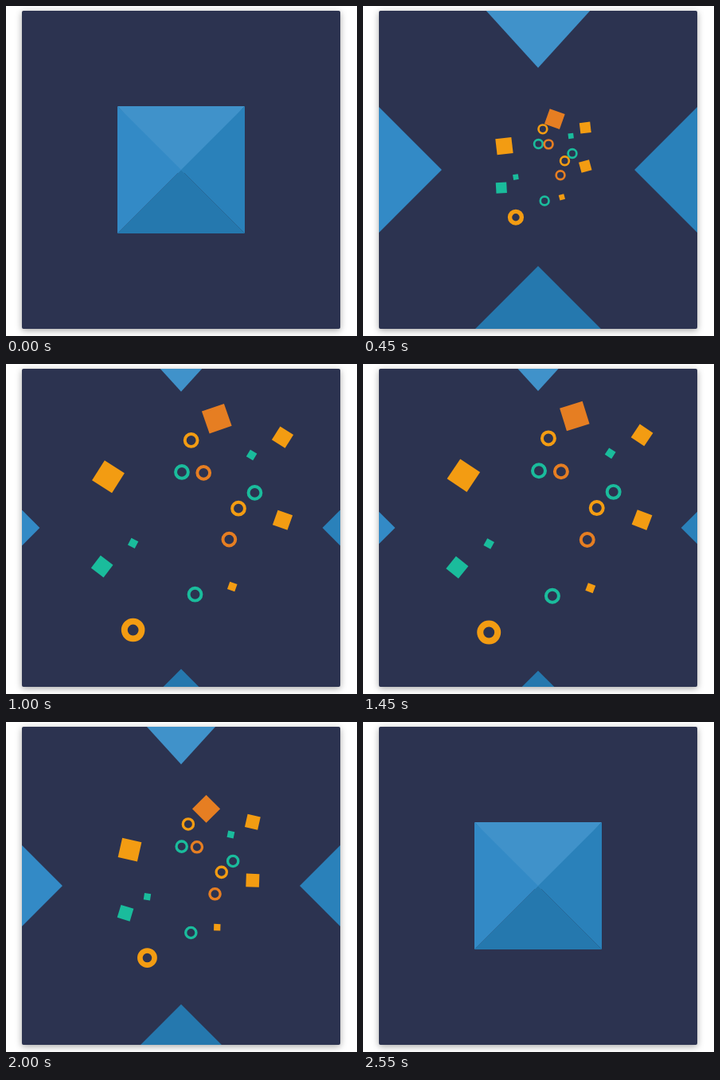
Animation, 441 px wide and 415 px high, one loop 2850 ms. Source, as an HTML page with a canvas:

```html
<!DOCTYPE html>
<html lang="en">
<head>
<meta charset="utf-8">
<title>Burst</title>
<style>
  html, body { margin: 0; width: 100%; height: 100%; overflow: hidden; background: #fff; }
  canvas { display: block; }
</style>
</head>
<body>
<canvas id="stage" width="441" height="415"></canvas>
<script>
const ctx = document.getElementById('stage').getContext('2d');
const LOOP = 2850, STEP = 50;
const PANEL = { x: 20, y: 6, size: 400 };
const CENTER = { x: 220, y: 206 };
const TRAVEL = 180;
const YELLOW = '#f39c12', ORANGE = '#e67e22', GREEN = '#1abc9c';

// x and y are the offset from the centre at full spread, turn is in degrees
const squares = [
  { x: 46, y: -141, size: 30, turn: 163, color: ORANGE },
  { x: -94, y: -66, size: 30, turn: 124, color: YELLOW },
  { x: 131, y: -117, size: 20, turn: 124, color: YELLOW },
  { x: 131, y: -10, size: 20, turn: 111, color: YELLOW },
  { x: 66, y: 76, size: 10, turn: 111, color: YELLOW },
  { x: -102, y: 50, size: 20, turn: 129, color: GREEN },
  { x: -62, y: 20, size: 10, turn: 119, color: GREEN },
  { x: 91, y: -94, size: 10, turn: 123, color: GREEN }
];
const rings = [
  { x: 13, y: -113, size: 20, line: 4, color: YELLOW },
  { x: 1, y: -72, size: 20, line: 4, color: GREEN },
  { x: 29, y: -71, size: 20, line: 4, color: ORANGE },
  { x: 95, y: -45.3, size: 20, line: 4, color: GREEN },
  { x: 74, y: -25, size: 20, line: 4, color: YELLOW },
  { x: 62, y: 15, size: 20, line: 4, color: ORANGE },
  { x: 18, y: 86, size: 20, line: 4, color: GREEN },
  { x: -62, y: 132, size: 30, line: 8, color: YELLOW }
];

const easeOut = (x, power) => 1 - Math.pow(1 - x, power);

// Linear progress: 0 when closed, 1 when fully open
function openness(time) {
  if (time < 150 || time >= 2550) return 0;
  const rise = (time - 72) / 1216;
  const fall = (2561 - time) / 1263;
  return Math.min(rise, fall, 1);
}

// The motion advances in even steps with two short holds
function stepTime(now) {
  const time = Math.floor((now % LOOP) / STEP) * STEP;
  return time === 1750 || time === 2300 ? time - STEP : time;
}

function panelPath() {
  ctx.beginPath();
  ctx.roundRect(PANEL.x, PANEL.y, PANEL.size, PANEL.size, 2);
}

function triangle(color, dx, dy, points) {
  ctx.fillStyle = color;
  ctx.beginPath();
  for (const [x, y] of points) ctx.lineTo(CENTER.x + dx + x, CENTER.y + dy + y);
  ctx.fill();
}

function drawParticles(scale) {
  for (const { x, y, size, turn, color } of squares) {
    ctx.save();
    ctx.scale(scale, scale);
    ctx.translate(x * scale, y * scale);
    ctx.rotate(turn * scale * Math.PI / 180);
    ctx.fillStyle = color;
    ctx.fillRect(-size / 2, -size / 2, size, size);
    ctx.restore();
  }
  for (const { x, y, size, line, color } of rings) {
    ctx.save();
    ctx.scale(scale, scale);
    ctx.strokeStyle = color;
    ctx.lineWidth = line;
    ctx.beginPath();
    ctx.arc(x * scale, y * scale, (size - line) / 2, 0, Math.PI * 2);
    ctx.stroke();
    ctx.restore();
  }
}

function drawTriangles(shift, topShift) {
  triangle('#4092ca', 0, -topShift, [[-80, -80], [80, -80], [0, 8]]);
  triangle('#2a81ba', shift, 0, [[80, -80], [80, 80], [0, 0]]);
  triangle('#2578ae', 0, shift, [[-80, 80], [80, 80], [0, 0]]);
  triangle('#338ac6', -shift, 0, [[-80, -80], [-80, 80], [0, 0]]);
}

function draw(time) {
  ctx.fillStyle = '#fff';
  ctx.fillRect(0, 0, 441, 415);

  ctx.save();
  ctx.shadowColor = 'rgba(0, 0, 0, 0.35)';
  ctx.shadowBlur = 8;
  ctx.shadowOffsetY = 2;
  ctx.fillStyle = '#2c3350';
  panelPath();
  ctx.fill();
  ctx.restore();

  const open = openness(time);
  const spread = easeOut(open, 3);
  ctx.save();
  panelPath();
  ctx.clip();
  if (spread > 0) {
    ctx.save();
    ctx.translate(CENTER.x, CENTER.y);
    drawParticles(spread);
    ctx.restore();
  }
  drawTriangles(TRAVEL * spread, TRAVEL * easeOut(open, 3.8));
  ctx.restore();
}

let start;
function tick(now) {
  start ??= now;
  draw(stepTime(Math.max(0, now - start)));
  requestAnimationFrame(tick);
}
draw(0);
requestAnimationFrame(tick);
</script>
</body>
</html>
```
